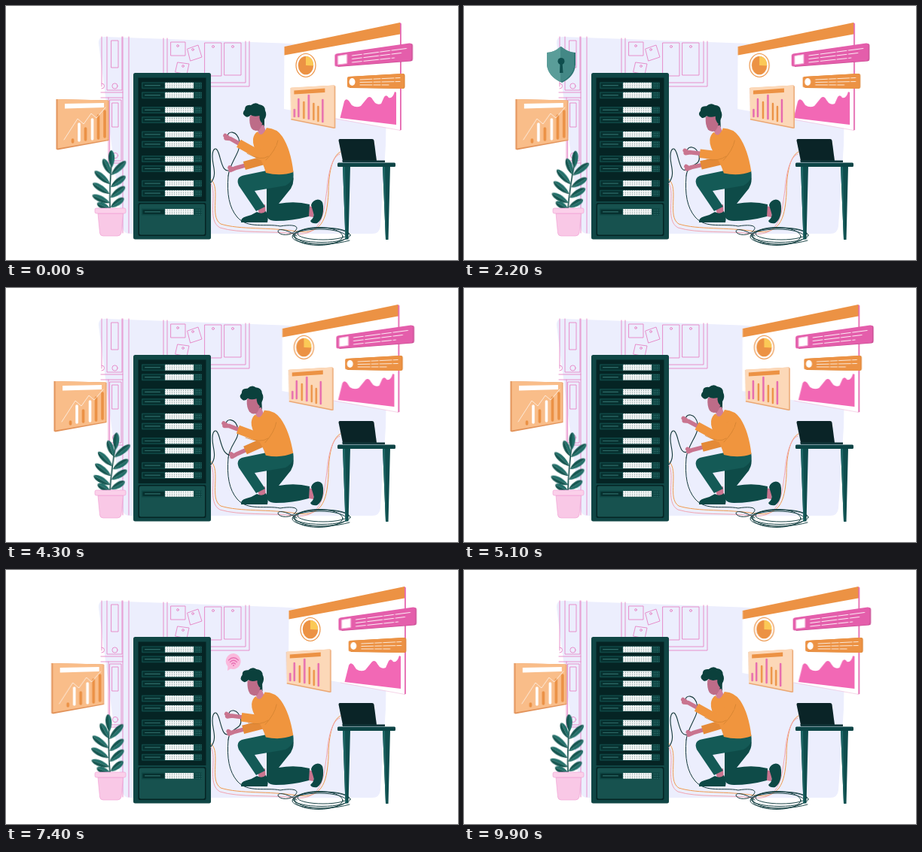
Recreate the animation shown at these times as an HTML page. Size 600 by 338 pixels, loop 10 s.

```html
<!DOCTYPE html>
<html lang="en">
<head>
<meta charset="utf-8">
<title>Server room</title>
<style>
  html, body { margin: 0; width: 100%; height: 100%; overflow: hidden; background: #fff; }
  svg { display: block; width: 100vw; height: 100vh; }
  .line { fill: none; stroke-linecap: round; stroke-linejoin: round; }
  .sleeve { fill: none; stroke-linejoin: round; stroke-width: 11.5; }
  .drift { animation: drift 5s cubic-bezier(.37, 0, .63, 1) infinite alternate; }
  .sway { transform-origin: 138px 270px; animation: sway 5s cubic-bezier(.37, 0, .63, 1) -7s infinite alternate; }
  .pop { animation: pop 10s linear infinite; }
  @keyframes drift {
    from { transform: translateX(calc(var(--mid) + var(--amp))); }
    to { transform: translateX(calc(var(--mid) - var(--amp))); }
  }
  @keyframes sway {
    from { transform: rotate(5.2deg); }
    to { transform: rotate(-5.2deg); }
  }
  @keyframes pop {
    0%, 7% { opacity: 0; }
    12%, 36% { opacity: 1; }
    40%, 100% { opacity: 0; }
  }
</style>
</head>
<body>
<svg viewBox="0 0 600 338" preserveAspectRatio="none">
  <defs>
    <pattern id="holes" width="3" height="2.6" patternUnits="userSpaceOnUse">
      <rect width="3" height="2.6" fill="#f4f6f6"/>
      <circle cx="1.5" cy="1.3" r=".65" fill="#7d9796"/>
    </pattern>
    <pattern id="vents" width="3" height="3" patternUnits="userSpaceOnUse">
      <circle cx="1.5" cy="1.5" r=".8" fill="#2c6c69"/>
    </pattern>
  </defs>

  <path fill="#eceefd" d="M131 41L367 49.500L495 58Q506 60 506 73L504 185L497 293Q496 303 486 303H165Q155 303 154 293L123 50Q122 41 131 41Z"/>

  <!-- shelves and notice board -->
  <g class="line" stroke="#e684c6" stroke-width=".9">
    <path d="M127 41V107M155 41V302M163 41V302M126 115H155M126 122H155M136 122V209H155M134 41V112H154V41"/>
    <path d="M140 46H149V82H140ZM138 125H153V206H138ZM141 129H149V161H141Z"/>
    <circle cx="144.500" cy="106.500" r="3.600"/><path d="M127 103A3.500 3.500 0 0 1 127 110"/><circle cx="145" cy="199" r="3.600"/>
    <path d="M209 43V107H323V47M214 43V102H318V47"/>
    <path d="M219 48H238V66H219ZM241 57L255 52L260 68L245 73ZM228 75L243 77L240 91L225 88ZM264 49H286V93H264ZM290 49H312V92H290Z"/>
    <circle cx="228" cy="53" r="1.400"/><circle cx="248" cy="58" r="1.400"/><circle cx="235" cy="80" r="1.400"/>
    <circle cx="275" cy="54" r="1.500"/><circle cx="301" cy="54" r="1.500"/>
  </g>

  <!-- left chart -->
  <g class="drift" style="--mid:-2.4px; --amp:4.5px; animation-delay:-8.4s">
    <path fill="#e2935a" d="M66.500 124L135 125.500L136.500 126V179L68.500 191.500L66.500 190.500Z"/>
    <path fill="#f9bd89" d="M68.500 124L135.500 125.500V178L68.500 189.500Z"/>
    <path fill="#fff" d="M78 130L130 129V135L78 136.500Z"/>
    <path class="line" stroke="#fff" stroke-width="3.600" d="M97 157V179M114.500 151V177"/>
    <path class="line" stroke="#eb9145" stroke-width="3.600" d="M88.500 178V181M105.500 163V178M122.500 146V176M131 140V174"/>
    <path class="line" stroke="#fff" stroke-width=".7" d="M77 178L95 150L103 157L113 143L120 149L132 135"/>
  </g>

  <!-- plant -->
  <g class="sway" id="plant">
    <path class="line" stroke="#0f4a47" stroke-width="1.600" d="M138 272Q138 240 142 208"/>
  </g>
  <path fill="#f9c8e6" stroke="#ee9bd0" stroke-width=".6" d="M122 276H155.500L153 302Q152 306 148 306H129Q125 306 124.500 302Z"/>
  <rect x="118" y="269" width="41" height="7" rx="2" fill="#fbd0ea" stroke="#ee9bd0" stroke-width=".6"/>

  <!-- shield -->
  <g class="pop">
    <path fill="#2f7775" d="M129 54Q139 62 148 62V78Q147 94 130 102Q112 94 110 78V62Q120 62 129 54Z"/>
    <path fill="#5a9d99" d="M128 54Q137 62 146 62V78Q145 93 128 101Q111 93 110 78V62Q119 62 128 54Z"/>
    <path fill="#438886" d="M128 54Q137 62 146 62V78Q145 93 128 101Z"/>
    <circle cx="129" cy="73.500" r="4.500" fill="#0f4e4e"/>
    <path fill="#0f4e4e" d="M127.500 75H130.500L131.500 89H127Z"/>
  </g>

  <!-- dashboard -->
  <g class="drift" style="--mid:0px; --amp:-6px; animation-delay:-7.5s">
    <path fill="#e568b0" d="M521 22.500L523 22L524.800 23.500V165L522.500 165.500Z"/>
    <path fill="#fff" d="M369.500 54L523 22V165L369 137Z"/>
    <path class="line" stroke="#f3c3df" stroke-width=".7" d="M438 150L523.500 165.500"/>
    <path fill="#ec9244" d="M369.500 54L523 22V37.500L369.500 65.500Z"/>
    <ellipse cx="398" cy="79" rx="13" ry="15.500" fill="#fff" stroke="#ec9244" stroke-width="1.200"/>
    <ellipse cx="398" cy="79" rx="10.200" ry="12.300" fill="#ec9244"/>
    <path fill="#fbc956" d="M398 79V66.700Q408.200 68 408.200 79.500Z"/>
    <path fill="#f268b5" d="M443.500 149L449 127Q451 122 455 126L459 132Q465 136 471 133L480 122Q484 119 487 125L490 129Q494 132 498 130L502 121Q505 117 508 122Q513 124 516 114L518 115V158Z"/>
  </g>

  <g class="drift" style="--mid:1.2px; --amp:-3.6px; animation-delay:-8.3s">
    <path fill="#c94b93" d="M440 64L538 50Q540.500 50 540.500 53V70Q540.500 73 538 73.500L441 81Z"/>
    <path fill="#e45eab" d="M439 63.500L536 49.500Q539 49 539 52V69.500Q539 72.500 536 73L439 80.500Q437 80.500 437 78V66Q437 64 439 63.500Z"/>
    <path fill="#fff" stroke="#f7b9dc" stroke-width="1" d="M441 66.500L453 64.500V76.500L441 78Z"/>
    <path class="line" stroke="#fff" stroke-width=".9" stroke-dasharray="13 2.500 20 2" d="M460 66L532 56.500M460 70.500L525 62.500M460 75L516 69"/>
  </g>

  <g class="drift" style="--mid:-.9px; --amp:-2.8px; animation-delay:-7s">
    <path fill="#d9802f" d="M456 94L527 90Q529.500 90 529.500 93V107Q529.500 110 527 110L456 109Z"/>
    <path fill="#ec9244" d="M455 94L525.500 90Q528.500 90 528.500 93V107Q528.500 110 525.500 110L455 108.500Q453 108.500 453 106V96Q453 94 455 94Z"/>
    <ellipse cx="459.500" cy="101" rx="4" ry="5" fill="#fff"/>
    <path class="line" stroke="#fff" stroke-width=".8" stroke-dasharray="16 2 9 2" d="M470 98L523 95.500M470 101.500L523 100.500M470 105H508"/>
  </g>

  <g class="drift" style="--mid:-2.8px; --amp:4px; animation-delay:-8.4s">
    <path fill="#eba773" d="M378.500 109L436.500 105.500L438 107V162.500L436 163L379 151.500Z"/>
    <path fill="#fcd8b8" d="M379 108.500L436.500 105.500V161.500L379 150Z"/>
    <path fill="#ec9244" d="M383 112.500L424 109.500V115L383 117.500Z"/>
    <g class="line" stroke-width="2.400">
      <path stroke="#e667ae" d="M383.500 138V147M389 124V147M402.500 119V150M421 125V154"/>
      <path stroke="#ec9244" d="M396 128V149M409 130V151M415 134V153"/>
    </g>
  </g>

  <!-- rack -->
  <g id="rack">
    <rect x="169" y="89" width="103" height="221.500" rx="2.500" fill="#104645"/>
    <rect x="175.500" y="95.500" width="90" height="164.500" fill="#052424"/>
    <rect x="175.500" y="262" width="90" height="44" rx="2" fill="#052424"/>
    <rect x="177" y="263.500" width="87" height="41" rx="2" fill="#17524f"/>
  </g>

  <!-- floor cables -->
  <g class="line" stroke-width="1">
    <path stroke="#ef9a4e" d="M272 231C286 242 269 280 285 290C310 298 350 294 386 300C424 306 426 274 428 250C428 225 432 200 444 194"/>
    <path stroke="#f0a4b0" d="M272 236C281 250 266 285 284 295C310 303 350 299 383 303C422 308 422 270 426 245C428 218 434 200 443 197"/>
    <path stroke="#16393b" d="M295 226C293 250 296 268 307 281C321 297 345 289 364 293C382 290 390 293 384 299C379 306 363 306 361 300C361 295 374 298 386 306"/>
    <g stroke="#1c4648">
      <ellipse cx="419" cy="305" rx="38" ry="9.500"/><ellipse cx="416" cy="307" rx="36" ry="10"/>
      <ellipse cx="421" cy="303" rx="34" ry="8"/><ellipse cx="415" cy="306.500" rx="32" ry="12"/>
      <path d="M382 304C384 316 420 322 456 312"/>
    </g>
  </g>

  <!-- table and laptop -->
  <path fill="#0f4d4d" d="M447 213H457L454.500 310.500H450.500ZM500 213H510L507.500 311H504Z"/>
  <path fill="#1c6463" d="M447 213H450L452 310.500H450.500ZM500 213H503L505 311H504Z"/>
  <rect x="440" y="208.500" width="77" height="5.500" rx="1.500" fill="#0d4546"/>
  <path fill="#0a2427" d="M443 177H486Q488 177 488.500 179L492 206H447L441.500 179Q441.500 177 443 177Z"/>
  <path fill="#12373a" d="M446 205.500H503V208H447Z"/>

  <!-- technician -->
  <path class="line" id="wire" stroke="#16393b" stroke-width="1.100"/>
  <path class="line" id="farSkin" stroke="#c9748f" stroke-width="5.500"/>
  <path class="sleeve" id="farArm" stroke="#e48a38"/>
  <path fill="#c9748f" d="M334 267L344 264L345 278H336ZM398 265L409 268L408 281L396 279Z"/>
  <path fill="#0e4b48" d="M346 238L381 223Q384 238 374 248L362 263Q384 259 403 264L402 280Q380 286 358 286Q345 286 346 275Z"/>
  <path fill="#145a56" d="M346 219L381 219Q384 232 371 239L330 246L344 267L332 273L309 239Q304 227 317 225Z"/>
  <path fill="#0d4845" d="M333 274Q340 278 345 273Q349 280 347 288H312Q311 282 319 280Q327 278 333 274Z"/>
  <path fill="#0d4845" d="M405 265Q407 258 414 257.500Q421 258 421 266Q422 283 413 289Q406 290 404 286Q410 281 408 275Z"/>
  <g id="torso">
    <path fill="#0b403c" d="M336 150H343V160L340 166H334Z"/>
    <path fill="#cf7f9b" d="M334 160L342 158L346 170Q341 177 335 172Z"/>
    <path fill="#f0953e" d="M334 167Q339 177 346 162Q360 163 367 174Q378 191 381.500 221Q365 227 345 222Q341 208 335 199Q327 186 328 177Q329 170 334 167Z"/>
    <path class="line" stroke="#cf8030" stroke-width=".7" d="M361 179Q358 192 345 205"/>
    <path fill="#bd6c88" d="M323.500 147Q331 138 340 146Q342 158 336 165Q330 168 326 163Q322.500 157 323.500 147Z"/>
    <path fill="#0b403c" d="M318 147Q312 143 317 138Q317 131 325 132Q331 127 336 131Q344 132 344 139Q347 145 343 151L340 156Q336 152 336.500 146Q329 148 325 145Q321 149 318 147Z"/>
  </g>
  <path class="line" id="nearSkin" stroke="#c9748f" stroke-width="5.500"/>
  <path class="sleeve" id="nearArm" stroke="#f0953e"/>
  <path class="line" id="fold" stroke="#cf8030" stroke-width=".7"/>

  <!-- signal bubble -->
  <g class="pop" style="animation-delay:-5s">
    <path fill="#fab9dc" d="M302 111A10.500 10.500 0 1 1 298 131.500L294 134L294.500 128.500A10.500 10.500 0 0 1 302 111Z"/>
    <path class="line" stroke="#e870b4" stroke-width="1.200" d="M295.500 120Q302 113.500 308.500 120M297.500 122.500Q302 118 306.500 122.500M299.500 125Q302 122.500 304.500 125"/>
    <circle cx="302" cy="127" r="1" fill="#e870b4"/>
  </g>
</svg>
<script>
  const $ = id => document.getElementById(id);
  const add = (parent, tag, attrs) => {
    const el = document.createElementNS('http://www.w3.org/2000/svg', tag);
    for (const k in attrs) el.setAttribute(k, attrs[k]);
    parent.append(el);
  };
  const box = (x, y, width, height, fill, rx = 0) => add($('rack'), 'rect', { x, y, width, height, fill, rx });

  function unit(y) {
    box(180, y - .5, 80, 9, '#0f4745', 1);
    box(181.5, y + 1, 28.5, 6, '#07302f', 1);
    box(184, y + 3.3, 21, 1.2, '#2d6b68', .6);
    box(211, y, 38, 7.8, 'url(#holes)');
    box(250.5, y, 9, 8, 'url(#vents)');
  }
  for (let i = 0; i < 5; i++) {
    unit(101.8 + 32.6 * i);
    unit(114.8 + 32.6 * i);
  }
  unit(270);

  // base x y, tip x y
  const leaves = [
    [138, 270, 121, 262], [139, 268, 157, 256], [138, 262, 115, 251], [139, 255, 159, 241], [138, 250, 116, 235],
    [140, 241, 160, 227], [139, 237, 119, 219], [141, 225, 161, 207], [140, 224, 131, 203], [142, 215, 142, 192]
  ];
  leaves.forEach(([x, y, tx, ty], i) => {
    const l = Math.hypot(tx - x, ty - y), w = 5.4;
    const transform = `translate(${x} ${y}) rotate(${Math.atan2(tx - x, y - ty) * 180 / Math.PI})`;
    const half = s => `C${s * w} ${-l * .3} ${s * w} ${-l * .9} 0 ${-l}`;
    add($('plant'), 'path', { transform, fill: '#226f69', d: `M0 0${half(1)}Z` });
    add($('plant'), 'path', { transform, fill: '#155650', d: `M0 0${half(-1)}Z` });
  });

  // seconds, upper hand x y, lower hand x y, lean
  const CYCLE = 5;
  const poses = [
    [0, 294, 174.5, 300, 217, 0],
    [.9, 296, 190, 298, 212, -2],
    [2.3, 296, 194, 298, 216, -3],
    [3.4, 290, 181, 301, 224.5, -5.5],
    [4.3, 292, 182, 302, 223, -4]
  ];
  const n = poses.length;
  const key = i => {
    const p = poses[(i + n) % n];
    return [p[0] + CYCLE * Math.floor(i / n), ...p.slice(1)];
  };

  function poseAt(t) {
    let i = n - 1;
    while (poses[i][0] > t) i--;
    const [a, b, c, d] = [key(i - 1), key(i), key(i + 1), key(i + 2)];
    const h = c[0] - b[0], u = (t - b[0]) / h, u2 = u * u, u3 = u2 * u;
    return b.slice(1).map((v, j) => {
      const k = j + 1;
      const m0 = (c[k] - a[k]) / (c[0] - a[0]) * h;
      const m1 = (d[k] - b[k]) / (d[0] - b[0]) * h;
      return v * (2 * u3 - 3 * u2 + 1) + m0 * (u3 - 2 * u2 + u) + c[k] * (3 * u2 - 2 * u3) + m1 * (u3 - u2);
    });
  }

  function arm(name, hx, hy, ex, ey, sx, sy) {
    const len = Math.hypot(ex - hx, ey - hy), dx = (ex - hx) / len, dy = (ey - hy) / len;
    const at = d => `${hx + dx * d} ${hy + dy * d}`;
    $(name + 'Skin').setAttribute('d', `M${hx - 3} ${hy - 2}L${hx} ${hy}L${hx - 2} ${hy + 1.5}L${at(4)}L${at(20)}`);
    $(name + 'Arm').setAttribute('d', `M${at(17)}L${ex} ${ey}L${sx} ${sy}`);
  }

  function draw() {
    const [ux, uy, lx, ly, lean] = poseAt(performance.now() / 1000 % CYCLE);
    $('torso').setAttribute('transform', `rotate(${lean / 83 * 180 / Math.PI} 358 226)`);
    arm('near', ux, uy, 338 + lean * .3, 199, 355 + lean * .6, 181);
    arm('far', lx, ly, 340, 206, 350, 197);
    $('fold').setAttribute('d', `M${ux + 26} ${uy + (199 - uy) * .6 + 7}Q${339 + lean * .3} 207 348 200`);
    $('wire').setAttribute('d',
      `M272 235C283 222 270 206 275 193Q279 185 283 198C287 212 289 224 ${lx} ${ly}` +
      `M${ux} ${uy}C${ux - 1} ${uy - 9} ${ux + 13} ${uy - 10} ${ux + 16} ${uy + 6}` +
      `C${ux + 18} ${uy + 20} 297 208 295 226`);
    requestAnimationFrame(draw);
  }
  draw();
</script>
</body>
</html>
```
